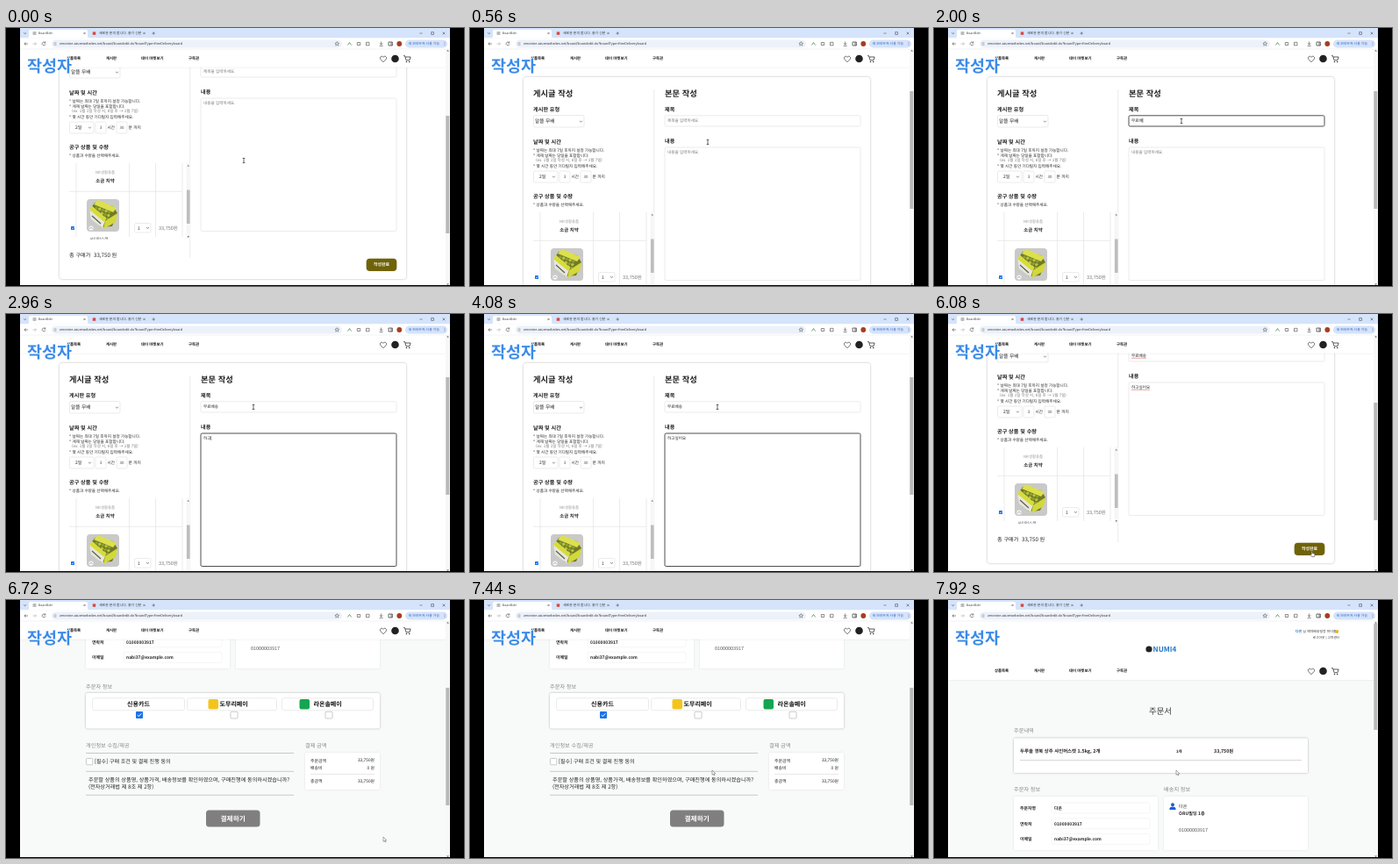
Recreate the animation shown at these times as an HTML page. Size 522x294 px, loop 8 s.

```html
<!DOCTYPE html>
<html lang="ko">
<head>
<meta charset="utf-8">
<title>공동구매 글 작성</title>
<style>
  html, body { margin: 0; width: 100%; height: 100%; overflow: hidden; background: #000; }
  svg { display: block; width: 100vw; height: 100vh; }
  text { font-family: "Noto Sans CJK KR", "Noto Sans CJK JP", "Noto Sans", sans-serif; text-rendering: geometricPrecision; white-space: pre; }
  .card { filter: drop-shadow(0 .8px 1px rgba(0, 0, 0, .3)); }
  .soft { filter: drop-shadow(0 .3px .8px rgba(0, 0, 0, .1)); }
  .caption { stroke: #fff; stroke-width: 1.4px; stroke-linejoin: round; paint-order: stroke; }
</style>
</head>
<body>
<svg id="stage" viewBox="0 0 522 294">
  <defs>
    <clipPath id="view"><rect x="16" y="24" width="485" height="270"/></clipPath>
    <clipPath id="list"><rect x="70" y="210" width="141" height="87"/></clipPath>
    <clipPath id="photo"><rect x="92" y="251" width="37" height="37" rx="4"/></clipPath>
  </defs>
</svg>
<script>
const LOOP = 8000, TICK = 80;
const stage = document.getElementById('stage');

function add(parent, tag, attrs = {}) {
  const node = document.createElementNS('http://www.w3.org/2000/svg', tag);
  for (const key in attrs) node.setAttribute(key, attrs[key]);
  parent.appendChild(node);
  return node;
}
const group = (parent, attrs) => add(parent, 'g', attrs);
const box = (parent, x, y, width, height, fill, more) => add(parent, 'rect', { x, y, width, height, fill, ...more });
const dot = (parent, cx, cy, r, fill) => add(parent, 'circle', { cx, cy, r, fill });
const path = (parent, d, stroke = '#333', width = .7, fill = 'none') =>
  add(parent, 'path', { d, stroke, 'stroke-width': width, fill });
const field = (parent, x, y, w, h, stroke = '#ddd', rx = 1.5) =>
  box(parent, x, y, w, h, '#fff', { stroke, 'stroke-width': .6, rx });
const chevron = (parent, x, y) => path(parent, `M${x - 1.4} ${y - .7}l1.4 1.4l1.4 -1.4`, '#333', .6);

// y is the vertical middle of the line
function label(parent, x, y, size, text, fill = '#222', weight = 400, anchor = 'start') {
  const node = add(parent, 'text', {
    x, y: y + size * .37, 'font-size': size, fill, 'font-weight': weight, 'text-anchor': anchor
  });
  node.textContent = text;
  return node;
}
const bold = (parent, x, y, size, text, anchor) => label(parent, x, y, size, text, '#222', 700, anchor);

function buildForm(page) {
  const g = group(page);
  box(g, 16, -60, 485, 460, '#fff');
  box(g, 61, 56, 395, 286, '#fff', { rx: 3, class: 'card' });
  path(g, 'M209.7 70V318', '#ddd', .6);

  bold(g, 72, 75, 9.3, '게시글 작성');
  bold(g, 222, 75, 9.3, '본문 작성');
  bold(g, 72, 92.7, 6.2, '게시판 유형');
  field(g, 72.5, 99.5, 57.5, 13.5);
  label(g, 74, 106.3, 5.7, '알뜰 무배');
  chevron(g, 126.5, 106.5);

  bold(g, 72, 130, 6.2, '날짜 및 시간');
  label(g, 72, 139, 4.6, '* 날짜는 최대 7일 후까지 설정 가능합니다.');
  label(g, 72, 144.8, 4.6, '* 게재 날짜는 당일을 포함합니다.');
  label(g, 75, 150.5, 4.5, '(ex: 1월 1일 작성 시, 6일 후 → 1월 7일)', '#777');
  label(g, 72, 157, 4.6, '* 몇 시간 동안 기다릴지 입력해주세요.');
  field(g, 72.5, 163, 27.5, 13);
  label(g, 79, 169.5, 5, '2일');
  chevron(g, 95.5, 169.5);
  field(g, 102, 163, 12, 13);
  label(g, 108, 169.5, 4.6, '3', '#444', 400, 'middle');
  label(g, 115.5, 169, 4.6, '시간');
  field(g, 126, 163, 12, 13);
  label(g, 132, 169.5, 4.4, '30', '#444', 400, 'middle');
  label(g, 139.5, 169, 4.7, '분 까지');

  bold(g, 72, 192, 6.2, '공구 상품 및 수량');
  label(g, 72, 201.7, 4.6, '* 상품과 수량을 선택해주세요.');
  buildList(group(g, { 'clip-path': 'url(#list)' }));
  label(g, 72, 315, 6.2, '총 구매가  33,750 원');
  box(g, 410.7, 318.7, 34.6, 14.2, '#6f6208', { rx: 4, class: 'soft' });
  label(g, 428, 325.5, 4.9, '작성완료', '#fff', 700, 'middle');

  bold(g, 222, 92.7, 6.2, '제목');
  const titleBox = field(g, 222, 99.8, 223, 12.2);
  bold(g, 222, 129, 6.2, '내용');
  const bodyBox = field(g, 222, 136, 223, 151.5);
  const titleText = label(g, 225, 105.3, 4.6, '');
  const bodyText = label(g, 225, 141.4, 4.6, '');
  const titleSpell = path(g, 'M225 108.3H242', '#d05050', .5);
  const bodySpell = path(g, 'M225 144.4H246.3', '#d05050', .5);
  const caret = box(g, 225, 103, .5, 5, '#222');
  return { g, titleBox, bodyBox, titleText, bodyText, titleSpell, bodySpell, caret };
}

function buildList(g) {
  path(g, 'M80 210V294M140.5 210V294M170.5 210V294M201 210V294M72 242.3H201', '#ddd', .6);
  label(g, 113, 220, 4.4, 'NR생활용품', '#999', 400, 'middle');
  bold(g, 113, 230, 5.4, '소금 치약', 'middle');
  buildPhoto(group(g, { 'clip-path': 'url(#photo)' }));
  dot(g, 97, 284, 2.6, '#f6f6f6');
  path(g, 'M95.6 284.6l1.4 -1.4l1.4 1.4', '#666', .6);
  label(g, 106, 296, 4.6, '샤인머스캣', '#555', 400, 'middle');
  box(g, 74, 282, 4, 4, '#1a73e8', { rx: .6 });
  path(g, 'M75 284l.9 .9l1.5 -1.8', '#fff', .6);
  field(g, 146.5, 278.5, 18.5, 10.5);
  label(g, 150, 283.8, 5, '1', '#333');
  chevron(g, 161.5, 283.8);
  label(g, 174, 283.7, 5.5, '33,750원', '#777');
  box(g, 205.5, 210, 4.5, 86, '#f6f6f6');
  box(g, 206, 240.5, 3.6, 38.5, '#bdbdbd');
  path(g, 'M206.6 213.6h2.4l-1.2 -1.6zM206.6 293.3h2.4l-1.2 1.6z', 'none', 0, '#666');
}

// A soft impression of a tray of green grapes
function buildPhoto(g) {
  const shape = (points, fill) => add(g, 'polygon', { points, fill });
  box(g, 92, 251, 37, 37, '#c9c9c8');
  shape('95,264 101,255 122,259 127,267 121,282 108,283', '#6f7a2a');
  shape('100,257 105,252 126,261 122,266', '#dce04c');
  for (let i = 0; i < 15; i++) {
    const col = i % 5, row = Math.floor(i / 5);
    dot(g, 103 + col * 3.7 - row, 261 + col * 1.2 + row * 3.8, 1.7, i % 2 ? '#b9c53a' : '#8f9f2c');
  }
  shape('95,263 98,259 114,273 110,284 97,274', '#e6e7dc');
  shape('95,263 98,259 114,273 112,277', '#d8dc36');
  shape('113,276 127,267 125,277 111,285', '#d3d83a');
  path(g, 'M98 270l10 9', '#5b5f4a', 1.2);
}

function buildOrder(page) {
  const g = group(page);
  box(g, 16, 0, 485, 520, '#f8f9f9');
  label(g, 258, 127, 9.4, '주문서', '#333', 400, 'middle');
  const heading = (x, y, text) => label(g, x, y, 6.2, text, '#888');
  heading(91, 149, '주문내역');
  box(g, 91, 157.5, 335, 39.5, '#fff', { rx: 1.5, class: 'card' });
  bold(g, 98, 172.3, 5.4, '두루솔 경북 상주 샤인머스캣 1.5kg, 2개');
  bold(g, 276, 172.8, 4.4, '1개');
  bold(g, 319, 172.3, 5.3, '33,750원');
  path(g, 'M98 182.6H419', '#bbb', .6);

  heading(91, 216, '주문자 정보');
  heading(262, 216, '배송지 정보');
  box(g, 91, 224, 164, 61, '#fff', { rx: 1.5, class: 'soft' });
  box(g, 262, 224, 164, 61, '#fff', { rx: 1.5, class: 'soft' });
  [['주문자명', '다온'], ['연락처', '01000003917'], ['이메일', 'nabi37@example.com']].forEach(([name, value], i) => {
    const y = 237 + i * 17.7;
    bold(g, 98, y, 4.9, name);
    field(g, 134, y - 6, 112, 12, '#eee');
    bold(g, 137, y, 4.9, value);
  });
  dot(g, 272, 233.3, 2, '#1a62d6');
  path(g, 'M268.3 239q0 -3.4 3.7 -3.4t3.7 3.4z', 'none', 0, '#1a62d6');
  label(g, 279, 235, 5.2, '다온', '#333');
  bold(g, 279, 243.5, 5.1, 'ORU빌딩 1층');
  label(g, 279, 262.5, 5.4, '01000003917', '#555');

  heading(91, 305.5, '주문자 정보');
  box(g, 91, 313, 335, 40.5, '#fff', { rx: 2, class: 'card' });
  [98, 206, 314].forEach((x, i) => {
    field(g, x + .5, 318.8, [105, 102, 104][i], 14, '#ddd', 2.5);
    const cx = [152, 260, 368][i];
    if (i) field(g, cx - 4, 334.3, 8, 7.7, '#aaa', 1);
    else box(g, cx - 4, 334, 8, 8, '#1a73e8', { rx: 1 });
  });
  path(g, 'M149.8 338l1.6 1.6l2.9 -3.3', '#fff', 1);
  label(g, 151, 325.6, 7, '신용카드', '#111', 700, 'middle');
  box(g, 230.5, 320, 11.5, 11.5, '#f3c51b', { rx: 2 });
  label(g, 243.5, 325.6, 7, '도무리페이', '#111', 700);
  box(g, 334.5, 320, 11.5, 11.5, '#14a650', { rx: 2 });
  label(g, 350.5, 325.6, 7, '라온솔페이', '#111', 700);

  heading(91, 373, '개인정보 수집/제공');
  path(g, 'M91 381.5H328M91 402.3H328M91 429.3H328', '#aaa', .6);
  field(g, 91.5, 387.5, 7.3, 7.3, '#aaa', 1);
  label(g, 101, 391.2, 6.05, '[필수] 구매 조건 및 결제 진행 동의');
  label(g, 94, 412, 6.15, '주문할 상품의 상품명, 상품가격, 배송정보를 확인하였으며, 구매진행에 동의하시겠습니까?');
  label(g, 94, 419.7, 6.15, '(전자상거래법 제 8조 제 2항)');
  box(g, 228, 446.5, 61.5, 19, '#7f7f7f', { rx: 3.5 });
  label(g, 258.7, 455.7, 7.7, '결제하기', '#fff', 700, 'middle');

  heading(341, 373, '결제 금액');
  box(g, 341, 381, 85, 42, '#fff', { rx: 1.5, class: 'soft' });
  [['주문금액', '33,750원', 389.7], ['배송비', '0 원', 398.4], ['총금액', '33,750원', 413.2]].forEach(([name, value, y]) => {
    label(g, 347, y, 4.9, name);
    label(g, 420, y, 4.8, value, '#222', 400, 'end');
  });
  path(g, 'M347 405.4H420', '#ccc', .5);
  return g;
}

function buildNav(parent) {
  const g = group(parent);
  [[69, '상품목록'], [114, '게시판'], [154, '데이 마켓보기'], [208, '구독권']].forEach(([x, text]) =>
    label(g, x, 34.6, 4.4, text, '#111', 700));
  path(g, 'M430 38.8l-3 -3.1c-1.9 -2.3 1.2 -5 3 -2.4c1.8 -2.6 4.9 .1 3 2.4z', '#333', .7);
  dot(g, 443.5, 35, 4.3, '#222');
  path(g, 'M453 31.7h1.6l1.4 5h4l1.1 -3.7h-6', '#333', .8);
  dot(g, 456.5, 38.5, .8, '#333');
  dot(g, 459.7, 38.5, .8, '#333');
  return g;
}

function buildHeader(page) {
  const bar = box(page, 16, 24, 485, 20.7, '#fff', { class: 'soft' });
  const full = group(page);
  dot(full, 245, 56, 3.6, '#222');
  label(full, 249.5, 56.2, 8.2, 'NUMI4', '#2277c8', 700);
  label(full, 412, 36, 4, '다온', '#2277c8', 700);
  label(full, 420.5, 36, 3.9, '님 예약배송일정 마이홈', '#333');
  dot(full, 459.3, 36, 2, '#e8b62a');
  label(full, 462, 42.5, 3.7, '로그아웃 | 고객센터', '#333', 400, 'end');
  return { bar, full, nav: buildNav(page) };
}

function buildBrowser(g) {
  box(g, 16, 0, 490, 11.5, '#d5e3fb');
  path(g, 'M24 11.5q2 0 2 -2V4q0 -2 2 -2H91q2 0 2 2v5.5q0 2 2 2z', 'none', 0, '#fff');
  chevron(g, 21.7, 6);
  box(g, 30.5, 4, 4, 4, '#bbb', { rx: .8 });
  label(g, 37, 6, 3.4, 'BoardEdit', '#333');
  box(g, 98.8, 4.4, 3.4, 3.4, '#d9483b');
  label(g, 106, 6, 3.9, '새로운 문의 합니다. 용기 신문', '#333');
  const cross = (x, r) => path(g, `M${x - r} ${6 - r}l${2 * r} ${2 * r}m0 ${-2 * r}l${-2 * r} ${2 * r}`, '#333', .5);
  cross(89.5, 1.1);
  cross(157.5, 1.1);
  cross(499, 1.4);
  path(g, 'M166.5 6h3.4M168.2 4.3v3.4M471.5 6h3M484.7 4.6h2.8v2.8h-2.8z', '#333', .5);

  box(g, 16, 11.5, 490, 12.5, '#fff');
  path(g, 'M25 18h-4m1.6 -1.6l-1.6 1.6l1.6 1.6', '#444', .6);
  path(g, 'M30.5 18h4m-1.6 -1.6l1.6 1.6l-1.6 1.6', '#aaa', .6);
  path(g, 'M44.6 16.8a1.9 1.9 0 1 0 .3 1.6m0 -3v1.6h-1.6', '#444', .6);
  box(g, 52, 13.6, 331, 8.8, '#edf1f9', { rx: 4.4 });
  path(g, 'M54.5 17h3M54.5 19h3', '#555', .5);
  label(g, 61, 17.8, 3.8, 'zeronine.azurewebsites.net/board/boardedit.do?boardType=freeDeliveryboard', '#333');
  path(g, 'M377.3 15.6l.7 1.6l1.7 .1l-1.3 1.1l.4 1.7l-1.5 -.9l-1.5 .9l.4 -1.7l-1.3 -1.1l1.7 -.1z', '#444', .5);
  path(g, 'M389.5 19.5l2 -3l2 3', '#3c8f58', .8);
  path(g, 'M400.3 16.5h3.4v3h-3.4zM410.5 16.3h3.5v3.5h-3.5z', '#444', .6);
  path(g, 'M427.6 15.5v3.5m-1.6 -1.5l1.6 1.6l1.6 -1.6M425.6 20.4h4', '#333', .6);
  path(g, 'M436 16h4.4v4H436zM439 16v4', '#333', .7);
  dot(g, 448.3, 18, 2.9, '#a83c22');
  box(g, 455, 13.6, 48, 8.8, '#d5e3fb', { rx: 4.4 });
  label(g, 458.5, 17.9, 3.9, '새 브라우저 사용 가능', '#2660b5');
  [16.2, 18, 19.8].forEach(y => dot(g, 500, y, .4, '#333'));
  path(g, 'M16 24H506', '#e3e6ea', .5);
}

function buildCursor(parent) {
  const g = group(parent);
  return {
    g,
    beam: path(g, 'M-1.3 -2.6H1.3M0 -2.6V2.6M-1.3 2.6H1.3', '#222', .7),
    arrow: path(g, 'M-1 -3V2.3L.3 1.2L1.2 3L2 2.6L1.2 .9H2.8z', '#555', .5, '#fff'),
    hand: path(g, 'M-.8 -2.6q.8 -.7 1.2 .2v2l2 .5q.8 .3 .6 1.2l-.6 2.3h-2.8l-1.9 -2.4q.2 -1 1.5 0z', '#222', .5, '#fff')
  };
}

// Timelines: [start, value, ...]
const SCROLL = [[0, 56], [80, 46], [160, 28], [240, 12], [320, 4], [400, 0], [5040, 0], [5120, 1], [5200, 4],
  [5280, 14], [5360, 28], [5440, 40], [5520, 50], [5600, 55], [5680, 57], [5760, 58]];
const ORDER_SCROLL = [[0, 207], [7440, 207], [7520, 150], [7600, 80], [7680, 25], [7760, 8], [7840, 2], [7920, 0]];
const POINTER = [[0, 271, 151], [480, 271, 151], [560, 271, 130], [640, 270, 112], [720, 269, 105], [800, 269, 105],
  [880, 282, 106], [4880, 282, 106], [5040, 360, 132], [5200, 433, 160], [5760, 433, 160], [5840, 432, 200],
  [5920, 431, 250], [6000, 431, 270], [6080, 431, 273], [6800, 431, 273], [7040, 365, 240], [7360, 277, 197]];
const TITLE = [[0, ''], [1520, 'ㅁ'], [1600, '무'], [1680, '물'], [1840, '무료'], [1920, '무룝'],
  [2000, '무료배'], [2080, '무료뱃'], [2160, '무료배소'], [2240, '무료배송']];
const BODY = [[0, ''], [2720, 'ㅎ'], [2880, '하'], [2960, '하고'], [3040, '하곳'], [3200, '하고시'], [3280, '하고싶'],
  [3360, '하고싶어'], [3520, '하고싶엉'], [3600, '하고싶어ㅇ'], [3680, '하고싶어요']];
const FOCUS = [[0, ''], [720, 'title'], [2400, 'body'], [4720, 'title'], [5920, '']];
const CARET = [[0, 0], [720, 1], [1040, 0], [1440, 1], [4080, 0], [4560, 1], [5120, 0]];
const ORDER_AT = 6640;

const last = (steps, t) => steps.filter(s => s[0] <= t).pop();
const step = (steps, t) => last(steps, t)[1];
function tween(steps, t, k = 1) {
  const a = last(steps, t), b = steps[steps.indexOf(a) + 1];
  return b ? a[k] + (b[k] - a[k]) * (t - a[0]) / (b[0] - a[0]) : a[k];
}
const show = (node, on) => node.setAttribute('visibility', on ? 'visible' : 'hidden');
const move = (node, x, y) => node.setAttribute('transform', `translate(${x} ${y})`);

box(stage, 16, 0, 490, 294, '#fff');
const page = group(stage, { 'clip-path': 'url(#view)' });
const form = buildForm(page);
const order = buildOrder(page);
const header = buildHeader(page);
box(stage, 501, 24, 5, 270, '#f7f7f7');
const thumb = box(stage, 501.3, 72, 4, 134, '#b8b8b8');
path(stage, 'M502.3 26.6h2.6l-1.3 -1.6zM502.3 291.4h2.6l-1.3 1.6z', 'none', 0, '#555');
buildBrowser(group(stage));
box(stage, 0, 293, 522, 1, '#000');
label(stage, 24, 42.8, 18.5, '작성자', '#3b8ae6', 700).setAttribute('class', 'caption');
const cursor = buildCursor(stage);

function fill(node, text, hint) {
  node.textContent = text || hint;
  node.setAttribute('fill', text ? '#222' : '#777');
}
function outline(node, on) {
  node.setAttribute('stroke', on ? '#222' : '#ddd');
  node.setAttribute('stroke-width', on ? .8 : .6);
}

function render(time) {
  const t = Math.floor(time % LOOP / TICK) * TICK;
  const ordering = t >= ORDER_AT;
  const y = tween(ordering ? ORDER_SCROLL : SCROLL, t);
  const open = ordering && y < 40;

  form.g.style.display = ordering ? 'none' : '';
  order.style.display = ordering ? '' : 'none';
  move(ordering ? order : form.g, 0, -y);

  header.full.style.display = open ? '' : 'none';
  move(header.full, 0, -y);
  move(header.nav, 0, open ? 46 - y : 0);
  header.bar.setAttribute('height', open ? 67 - y : 20.7);

  const top = !ordering ? 72 + y / 2 : open ? 27 + y * .45 : 27 + Math.max(0, y - 61) / 2;
  thumb.setAttribute('y', top);
  thumb.setAttribute('height', open ? 121 : 134);

  const title = step(TITLE, t), body = step(BODY, t), focus = step(FOCUS, t);
  fill(form.titleText, title, '제목을 입력하세요.');
  fill(form.bodyText, body, '내용을 입력하세요.');
  outline(form.titleBox, focus === 'title');
  outline(form.bodyBox, focus === 'body');
  show(form.titleSpell, title && body && !focus);
  show(form.bodySpell, t >= 4560);
  show(form.caret, focus && step(CARET, t));
  const typed = focus === 'body' ? body : title;
  form.caret.setAttribute('x', 225 + typed.length * 4.6 * .92);
  form.caret.setAttribute('y', focus === 'body' ? 139 : 102.8);

  const px = tween(POINTER, t), py = tween(POINTER, t, 2);
  move(cursor.g, px, py);
  const hand = !ordering && py > 263;
  show(cursor.hand, hand);
  show(cursor.arrow, ordering);
  show(cursor.beam, !hand && !ordering);
}

const start = performance.now();
function loop() {
  render(performance.now() - start);
  requestAnimationFrame(loop);
}
loop();
</script>
</body>
</html>
```
